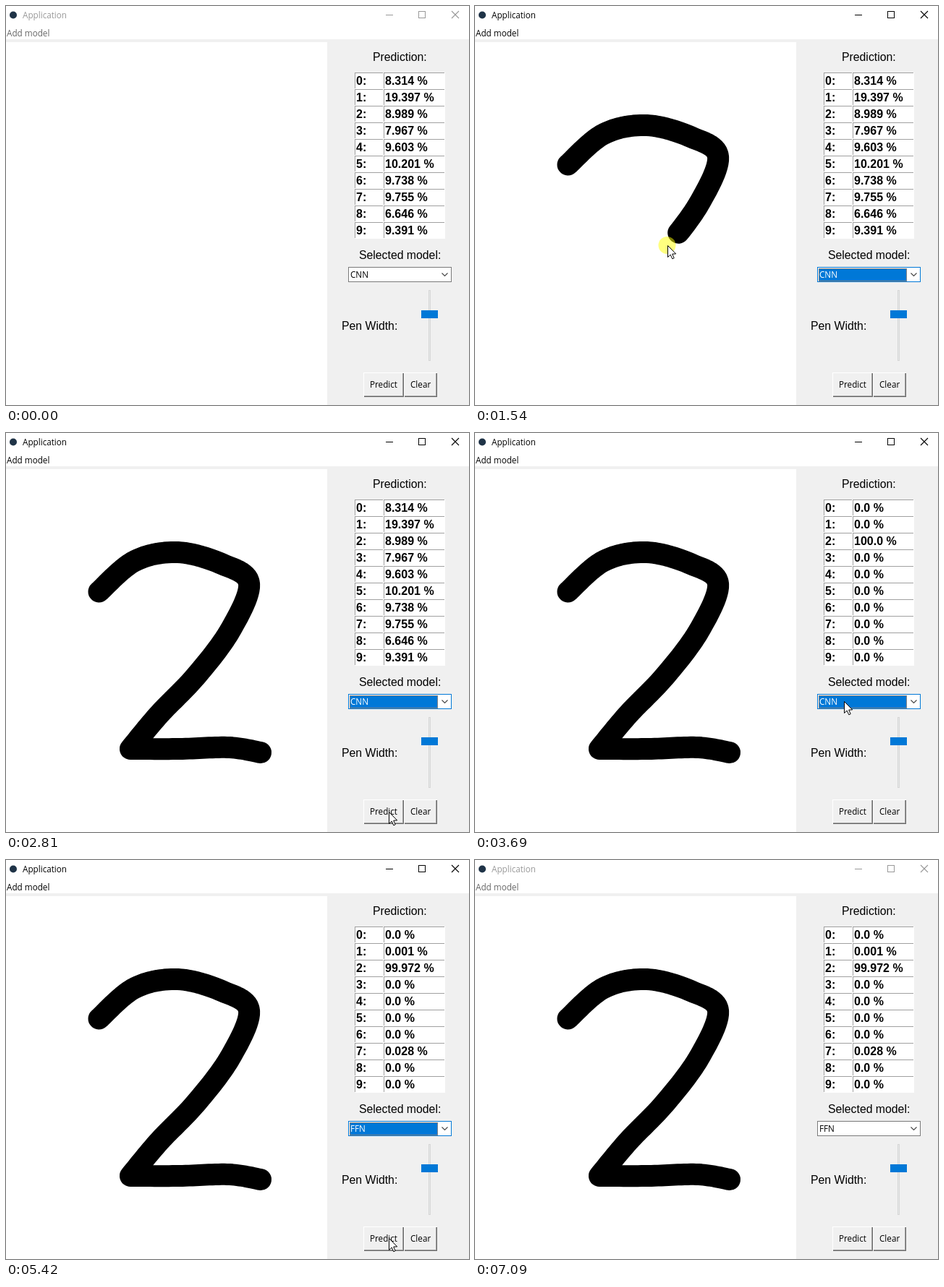
Write an HTML page with a canvas that moves like this. It is 640 px wide and 552 px high and loops after 7120 ms.

```html
<!DOCTYPE html>
<html lang="en">
<head>
<meta charset="utf-8">
<title>Application</title>
<style>
  html, body { margin: 0; width: 100%; height: 100%; overflow: hidden; background: #fff; }
  canvas { display: block; }
</style>
</head>
<body>
<canvas id="stage" width="640" height="552"></canvas>
<script>
const ctx = document.getElementById('stage').getContext('2d');
const LOOP = 7120;
const FOCUS = 840, BLUR = 7090;
const PEN_DOWN = 930, PEN_UP = 2267, PEN_LAG = 30;
const PANEL = '#f0f0f0', BLUE = '#0078d7';
const UI = '11.7px "Open Sans", "Noto Sans", sans-serif';
const LABEL = '15.8px "Liberation Sans", Arial, sans-serif';
const BOLD = 'bold 16px "Liberation Sans", Arial, sans-serif';

// Places the pointer visits
const entry = [492, 471], idle = [188, 251], released = [363, 447], below = [531, 560];
const predict = [529, 523], combobox = [510, 366], item = [506, 409];
const slider = [574, 430], thumb = [584, 470], exit = [596, 560];

const hook = [
  [128.5, 219.5], [178, 177], [237, 165], [298, 181], [336, 208],
  [310, 273], [262, 337], [212, 389], [172, 437]
];
const base = [[172, 437], [240, 437], [308, 435], [352, 442]];

const glide = p => p * p * (3 - 2 * p);
const part = (a, b) => p => a + (b - a) * p;

const moves = [
  { start: 100, end: 310, path: [entry, idle] },
  { start: 460, end: 670, path: [idle, hook[0]] },
  { start: PEN_DOWN, end: 1550, path: hook, ease: part(0, .75) },
  { start: 1590, end: 1840, path: hook, ease: part(.75, 1) },
  { start: 1895, end: PEN_UP, path: base, ease: part(0, 1) },
  { start: PEN_UP, end: 2290, path: [base[3], released] },
  { start: 2340, end: 2450, path: [released, below] },
  { start: 2620, end: 2850, path: [below, predict] },
  { start: 3340, end: 3750, path: [predict, combobox] },
  { start: 4090, end: 4300, path: [combobox, item] },
  { start: 4590, end: 5040, path: [item, predict] },
  { start: 5980, end: 6680, path: [predict, slider, thumb] },
  { start: 6730, end: 6810, path: [thumb, exit] }
];

const press = {
  draw: [FOCUS, 2275], first: [2930, 3060], open: [3860, 3980],
  choose: [4480, 4590], second: [5130, 5260]
};

const initial = [8.314, 19.397, 8.989, 7.967, 9.603, 10.201, 9.738, 9.755, 6.646, 9.391];
const cnn = { 2: '100.0' };
const ffn = { 1: '0.001', 2: '99.972', 7: '0.028' };

const within = (t, [a, b]) => t >= a && t < b;

// Catmull-Rom curve through the points, p from 0 to 1
function along(points, p) {
  const last = points.length - 1;
  const i = Math.min(Math.floor(p * last), last - 1);
  const u = p * last - i;
  const at = k => points[Math.max(0, Math.min(last, k))];
  return [0, 1].map(axis => {
    const [a, b, c, d] = [i - 1, i, i + 1, i + 2].map(k => at(k)[axis]);
    return b + u / 2 * (c - a + u * (2 * a - 5 * b + 4 * c - d + u * (3 * (b - c) + d - a)));
  });
}

function pointerAt(t) {
  const move = moves.findLast(m => m.start <= t);
  if (!move) return null;
  const p = Math.min(1, (t - move.start) / (move.end - move.start));
  return along(move.path, (move.ease || glide)(p));
}

function box(x, y, w, h, color) {
  ctx.fillStyle = color;
  ctx.fillRect(x, y, w, h);
}

function frame(x, y, w, h, color) {
  ctx.strokeStyle = color;
  ctx.lineWidth = 1;
  ctx.strokeRect(x + .5, y + .5, w - 1, h - 1);
}

function text(s, x, y, font = UI, color = '#000') {
  ctx.font = font;
  ctx.fillStyle = color;
  ctx.fillText(s, x, y);
}

function line(points, color, width) {
  ctx.strokeStyle = color;
  ctx.lineWidth = width;
  ctx.beginPath();
  points.forEach(([x, y]) => ctx.lineTo(x, y));
  ctx.stroke();
}

function disc(x, y, r, color) {
  ctx.fillStyle = color;
  ctx.beginPath();
  ctx.arc(x, y, r, 0, 7);
  ctx.fill();
}

function titleBar(active) {
  const ink = active ? '#000' : '#999';
  disc(10, 12.5, 5, '#1f3347');
  text('Application', 23, 17, UI, ink);
  text('Add model', 1, 42, UI, active ? '#000' : '#666');
  box(525, 12, 10, 1, ink);
  frame(570, 7, 10, 10, ink);
  line([[616, 7], [626, 17]], ink, 1.1);
  line([[626, 7], [616, 17]], ink, 1.1);
}

function drawing(t) {
  if (t < FOCUS) return;
  const end = Math.min(t - PEN_LAG, PEN_UP);
  const trail = [hook[0]];
  for (let s = PEN_DOWN; s < end; s += 8) trail.push(pointerAt(s));
  trail.push(end > PEN_DOWN ? pointerAt(end - .01) : [128.6, 219.5]);
  ctx.lineCap = ctx.lineJoin = 'round';
  line(trail, '#000', 30);
  ctx.lineCap = 'butt';
  ctx.lineJoin = 'miter';
}

function cell(x, y, w, s) {
  box(x, y, w, 23, '#fff');
  box(x, y, w - 1, 1, '#a0a0a0');
  box(x, y, 1, 22, '#a0a0a0');
  text(s, x + 2, y + 17, BOLD);
}

function table(values) {
  for (let i = 0; i < 10; i++) {
    const y = 92 + 23 * i;
    cell(482, y, 40, `${i}:`);
    cell(522, y, 85, `${values[i] ?? '0.0'} %`);
  }
}

function button(x, w, label, textX, down) {
  const y = 507, h = 34, d = down ? 1 : 0;
  box(x, y, w, h, down ? '#696969' : '#fff');
  box(x + 1, y + 1, w - 1, h - 1, down ? '#fff' : '#696969');
  box(x + 1, y + 1, w - 2, h - 2, '#a0a0a0');
  box(x + 1 + d, y + 1 + d, w - 3, h - 3, PANEL);
  text(label, textX + d, 528 + d);
}

function combo(model, active, open) {
  const focused = active && !open;
  box(473, 361, 143, 21, '#fff');
  frame(473, 361, 143, 21, focused ? BLUE : '#7a7a7a');
  if (focused) {
    box(475, 363, 122, 18, BLUE);
    ctx.setLineDash([1, 1]);
    frame(475, 363, 122, 18, '#ff8728');
    ctx.setLineDash([]);
  }
  if (open) {
    box(599, 361, 17, 21, '#cce4f7');
    frame(599, 361, 17, 21, '#005499');
  }
  text(model, 476, 376, UI, focused ? '#fff' : '#000');
  line([[602.5, 369.5], [606.5, 373.5], [610.5, 369.5]], '#444', 1.1);
}

function popup(selected) {
  box(473, 382, 143, 36, '#fff');
  frame(473, 382, 143, 36, '#646464');
  box(475, 384 + 16 * selected, 139, 16, BLUE);
  ['CNN', 'FFN'].forEach((s, i) =>
    text(s, 475, 396 + 16 * i, UI, i === selected ? '#fff' : '#000'));
}

function arrow(x, y) {
  ctx.save();
  ctx.translate(x + .5, y + .5);
  const shape = new Path2D('M0 0V16L3.7 12.6L6.3 18.3L8.7 17.2L6.2 11.6L11.2 11.4Z');
  ctx.fillStyle = '#fff';
  ctx.fill(shape);
  ctx.strokeStyle = '#000';
  ctx.lineWidth = 1;
  ctx.stroke(shape);
  ctx.restore();
}

function pointer(t) {
  const spot = pointerAt(t);
  if (!spot) return;
  const [x, y] = spot.map(Math.floor);
  if (Object.values(press).some(p => within(t, p))) disc(x - .5, y, 12, 'rgba(255,255,0,.5)');
  arrow(x, y);
}

function render(t) {
  const active = within(t, [FOCUS, BLUR]);
  const open = within(t, [3900, press.choose[1]]);
  const values = t < press.first[1] ? initial : t < press.second[1] ? cnn : ffn;

  box(0, 0, 640, 552, '#fff');
  box(0, 46, 640, 4, PANEL);
  box(444, 46, 196, 506, PANEL);
  titleBar(active);
  drawing(t);

  text('Prediction:', 507, 76, LABEL);
  table(values);

  text('Selected model:', 488, 350, LABEL);
  combo(t < press.choose[1] ? 'CNN' : 'FFN', active, open);

  text('Pen Width:', 464, 448, LABEL);
  box(584, 393, 3, 98, '#e7eaea');
  frame(584, 393, 3, 98, '#d6d6d6');
  box(574, 421, 23, 11, BLUE);

  button(494, 56, 'Predict', 503, within(t, press.first) || within(t, press.second));
  button(550, 46, 'Clear', 559, false);
  if (open) popup(t < 4220 ? 0 : 1);
  pointer(t);
}

function tick() {
  render(performance.now() % LOOP);
  requestAnimationFrame(tick);
}
tick();
</script>
</body>
</html>
```
